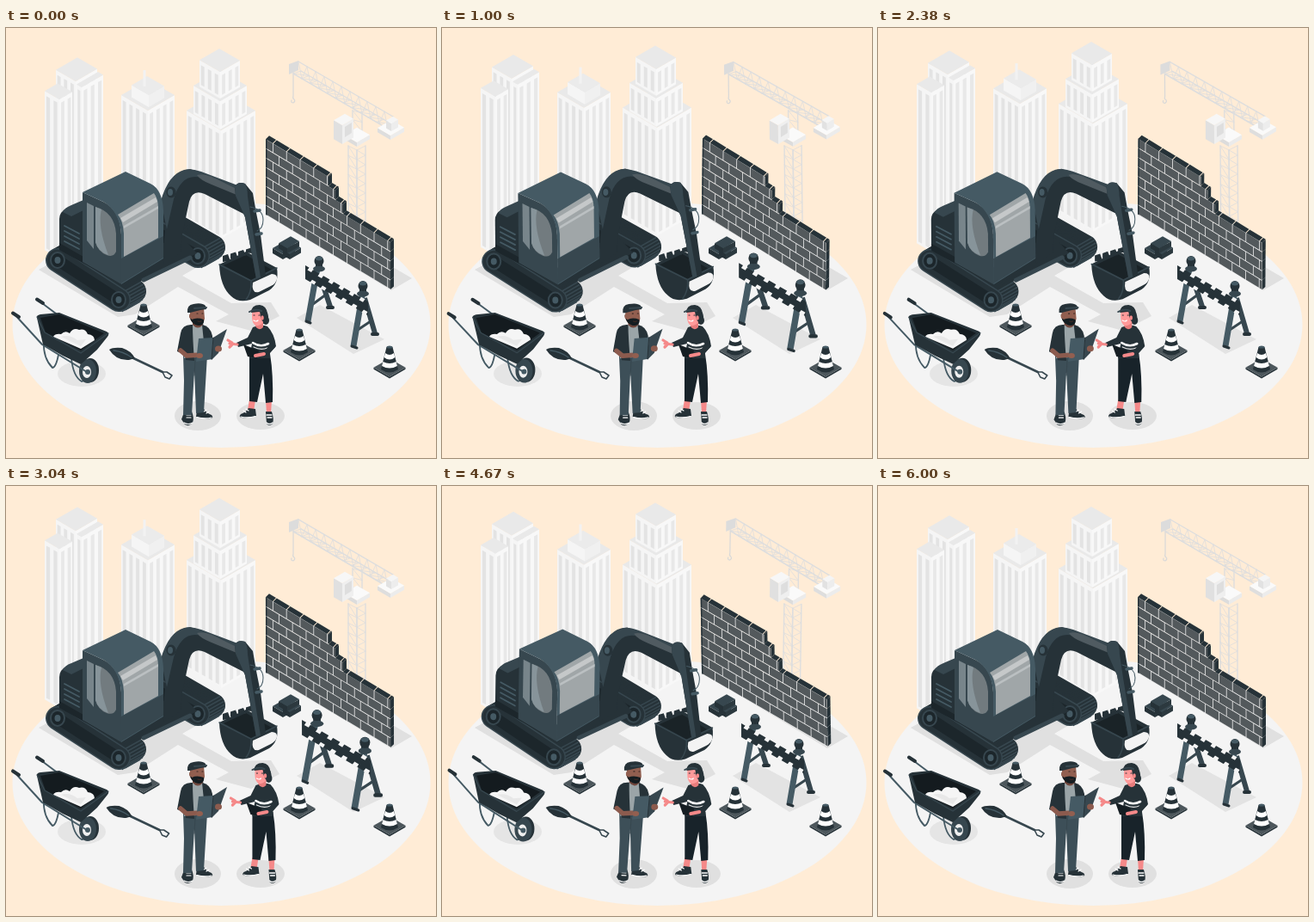
These frames come from a looping animation (500 px wide and 500 px high, 6.04 s). An HTML page:

```html
<!DOCTYPE html>
<html lang="en">
<head>
<meta charset="utf-8">
<title>Construction site</title>
<style>
html, body { margin: 0; width: 100%; height: 100%; overflow: hidden; background: #ffecd6 }
svg { display: block; width: 100%; height: 100% }
</style>
</head>
<body>
<svg id="stage" viewBox="0 0 500 500"></svg>
<script>
const INK = '#263238', DARK = '#37474f', MID = '#455a64', SHADE = '#e0e0e0';
const K = 0.577;

const poly = (pts, fill) => `<polygon points="${pts}" fill="${fill}"/>`;
const path = (d, fill) => `<path d="${d}" fill="${fill}"/>`;
const line = (d, color, w = 1, cap = 'round') =>
  `<path d="${d}" fill="none" stroke="${color}" stroke-width="${w}" stroke-linecap="${cap}" stroke-linejoin="round"/>`;
const oval = (x, y, rx, ry, fill) => `<ellipse cx="${x}" cy="${y}" rx="${rx}" ry="${ry}" fill="${fill}"/>`;
const group = (id, ...parts) => `<g id="${id}">${parts.join('')}</g>`;
const times = (n, f) => Array.from({ length: n }, (_, i) => f(i)).join('');

// Isometric block; (x, y) is the front corner of its top, a and b run left and right
function box(x, y, a, b, h, top, left, right) {
  const l = [x - a, y - a * K], r = [x + b, y - b * K];
  return poly([x, y, ...l, l[0], l[1] + h, x, y + h], left) +
    poly([x, y, ...r, r[0], r[1] + h, x, y + h], right) +
    poly([x, y, ...l, x - a + b, y - (a + b) * K, ...r], top);
}

function stripes(x, y, len, dir, n, h, color) {
  const step = len / n;
  return times(n, i => {
    const p = x + dir * (i + .28) * step, q = p + dir * step * .5;
    const v = u => y - Math.abs(u - x) * K + 5;
    return poly([p, v(p), q, v(q), q, v(q) + h - 8, p, v(p) + h - 8], color);
  });
}

const tower = (x, y, a, b, h, n, m) =>
  box(x, y, a, b, h, '#e9e9e9', '#f5f5f5', '#f8f8f8') +
  stripes(x, y, a, -1, n, h, '#e3e3e3') + stripes(x, y, b, 1, m, h, '#e8e8e8');

function lattice(x0, y0, x1, y1, dx, dy, n) {
  let zig = '';
  for (let i = 0; i <= n; i++) {
    const x = x0 + (x1 - x0) * i / n, y = y0 + (y1 - y0) * i / n;
    zig += `M${x},${y}l${dx},${dy}`;
    if (i < n) zig += `M${x},${y}L${x + (x1 - x0) / n + dx},${y + (y1 - y0) / n + dy}`;
  }
  return line(`M${x0},${y0}L${x1},${y1}M${x0 + dx},${y0 + dy}L${x1 + dx},${y1 + dy}`, '#dedede', 1.4) +
    line(zig, '#dedede', .8);
}

function wall() {
  const limit = [145, 145, 145, 145, 145, 90, 81, 73], H = 11;
  let s = '';
  limit.forEach((w, r) => {
    const y = -(r + 1) * H, next = limit[r + 1] || 0;
    s += `<path d="M${w},${y}l4,-6v${H}l-4,6z" fill="${INK}"/><path d="M0,${y}H${w}v${H}H0z" fill="#ececec"/>`;
    for (let x = r % 2 ? -7 : 0; x < w; x += 15.8) {
      const a = Math.max(x, 0), b = Math.min(x + 15, w);
      if (b - a < 1) continue;
      s += `<rect x="${a}" y="${y + .4}" width="${b - a}" height="${H - .9}" fill="#53595c"/>`;
      const c = Math.max(a, next);
      if (c < b) s += `<path d="M${c},${y + .3}l4,-6.5H${b + 4}l-4,6.5z" fill="${INK}"/>`;
    }
    s += `<path d="M0,${y}h1.5v${H}h-1.5z" fill="${INK}"/>`;
  });
  return `<g transform="matrix(1 .6 0 1 302 217)">${s}</g>`;
}

function cone(x, y) {
  return box(x, y + 9.5, 18.5, 18.5, 2, '#4d575c', INK, INK) +
    path(`M${x - 3.5},${y - 25}L${x - 10},${y + 1}Q${x},${y + 8} ${x + 10},${y + 1}L${x + 3.5},${y - 25}z`, INK) +
    [[-18, 5], [-8, 7.6]].map(([d, r]) =>
      path(`M${x - r},${y + d}q${r},4 ${2 * r},0l1.3,5q${-r - 1.3},5 ${-2 * r - 2.6},0z`, '#fff')).join('') +
    oval(x, y - 25, 3.5, 1.6, MID);
}

function track(x0, y0, x1, y1) {
  const bar = (c, w, dx = 0, dy = 0) => line(`M${x0 + dx},${y0 + dy}L${x1 + dx},${y1 + dy}`, c, w);
  const wheel = (x, y) => oval(x, y, 9, 10, DARK) + oval(x, y, 7, 8, '#1c262b') + oval(x, y, 3.5, 4, MID);
  return times(9, i => bar(INK, 28, 18 - i * 2, -10 + i * 1.15)) +
    times(9, i => {
      const a = -.9 + i * .27, x = x1 + 14 * Math.cos(a), y = y1 + 14 * Math.sin(a);
      return line(`M${x},${y}l17,-9.5`, DARK, 1.6);
    }) +
    bar(DARK, 28) + bar(INK, 25) + bar('#1c262b', 13) + wheel(x0, y0) + wheel(x1, y1);
}

const skyline = group('skyline',
  tower(81, 62, 23, 25, 200, 3, 3), tower(88, 69, 6, 25, 200, 1, 3), tower(62, 83, 17, 15, 185, 2, 2),
  tower(165, 96, 31, 31, 130, 4, 4), box(166, 78, 20, 18, 14, '#ebebeb', '#f5f5f5', '#f0f0f0'),
  line('M161,49V68', '#f2f2f2', 3, 'butt'),
  tower(250, 119, 40, 40, 126, 5, 5), tower(249, 85, 31, 31, 33, 4, 4), tower(249, 51, 24, 23, 31, 3, 3));

const crane = group('crane',
  lattice(398, 137, 398, 226, 10, 5, 8), lattice(408, 142, 408, 230, 10, -5, 8),
  lattice(403, 96, 403, 128, 11, 3, 3),
  box(408, 133, 15, 15, 5, '#fafafa', '#dcdcdc', '#ebebeb'),
  box(391, 113, 10, 13, 22, '#f7f7f7', SHADE, '#efefef'), poly([394, 115, 402, 110, 402, 122, 394, 127], '#dedede'),
  lattice(340, 39, 450, 103, -6, 14, 11), lattice(334, 53, 440, 115, 9, -3, 11),
  poly([329, 42, 340, 38, 340, 49, 329, 54], '#dcdcdc'),
  line('M334,54V79M334,79q-1,3 1,4q2,2 -1,4q-3,0 -2,-3', '#d8d8d8', 1.2),
  box(447, 125, 15, 16, 5, '#fafafa', '#dedede', '#ececec'),
  box(448, 111, 6, 8, 9, '#f5f5f5', '#e2e2e2', '#ededed'));

const ground = oval(250.5, 345, 243, 143, '#f4f4f4');
const shadows = poly([38, 281, 150, 220, 250, 262, 205, 288, 262, 320, 308, 319, 318, 335, 285, 352, 244, 341, 259, 333, 200, 301, 150, 333, 130, 336], SHADE) +
  poly([302, 217, 326, 206, 472, 291, 448, 305], SHADE) +
  poly([338, 337, 365, 322, 440, 362, 404, 379], '#e3e3e3') +
  oval(88, 402, 28, 15, '#e5e5e5') + oval(223, 451, 27, 17, SHADE) + oval(296, 451, 28, 16, SHADE);

const excavator = group('excavator',
  track(148, 222, 223, 265),
  poly([120, 285, 205, 243, 222, 262, 150, 298], INK), line('M160,293L214,267', DARK, 5),
  track(60, 270, 131, 316),
  path('M62,222Q62,214 70,210L90,201L112,214V282L62,257z', INK),
  path('M66,214Q68,209 76,206L90,200V212L76,219z', DARK),
  times(4, i => line(`M68,${230 + i * 6}l17,9`, MID, 1.8)),
  poly([62, 250, 134, 291, 134, 298, 62, 258], '#1c262b'),
  // boom
  line('M179,211L193,188', MID, 6), line('M181,208L195,184', '#f0f0f0', 1),
  path('M182,267L188,202Q192,166 214,164L224,167L278,188L280,218L231,193Q217,187 213,202L205,240L203,262L184,274z', INK),
  path('M180,201Q189,170 207,165Q215,163 227,167L280,187L275,192L227,174Q204,168 195,199L187,234z', DARK),
  path('M222,171Q229,169 239,173L266,186L273,196L239,182Q226,177 222,171z', '#505b61'),
  oval(192, 191, 5.5, 6.5, INK) + oval(191, 191, 3, 4, MID),
  // cab
  path('M89,191L113,202Q133,212 134,240V298L89,272z', DARK),
  path('M89,191L139,167L168,181Q182,188 183,212V268L134,298V240Q132,213 113,202z', MID),
  path('M134,268L183,242V267L134,297z', DARK),
  path('M137,266V239Q136,224 130,217L172,192Q177,198 177,210V244z', '#a0a6a8'),
  path('M133,221L174,197L176,202L136,226z', '#c5c8c9'), path('M137,230L177,207V210L137,233z', '#bbc0c2'),
  path('M94,203L102,207V257L94,247z', '#78858b'),
  path('M104,208Q126,214 128,239V260Q125,267 117,264Q107,260 104,249z', '#727b7f'),
  path('M104,208L111,211Q106,230 119,264Q107,260 104,249z', '#87949a'),
  // bucket
  path('M248,275L279,260L315,279Q318,297 306,305L284,316Q270,320 262,312Q249,301 248,275z', INK),
  path('M253,276L279,264L309,281L285,293z', '#1a2327'),
  line('M248,275L285,294L315,279M285,294Q286,307 279,316', DARK, 1.5),
  times(4, i => poly([252 + i * 9, 272 - i * 3.5, 252 + i * 9, 265 - i * 2.5, 258 + i * 9, 263 - i * 2.5, 261 + i * 9, 271 - i * 3], INK)),
  path('M287,296L309,286Q316,286 315,292Q314,297 308,300L294,307Q285,309 287,296z', '#f3f3f3'),
  // stick
  path('M266,185Q269,178 278,181L287,192L291,215L296,240L302,288L291,292L278,220L267,195z', INK),
  path('M266,185Q269,178 278,181Q281,186 281,196L285,223L296,290L291,292L278,220L267,195z', DARK),
  line('M289,213l6,-1M291,240l6,-1', MID, 3.5),
  line('M284,208Q299,211 299,223Q299,233 292,236', MID, 1));

const bricks = [[322, 263, 12, 14], [330, 263, 8, 13], [327, 256, 10, 14]].map(([x, y, a, b]) =>
  box(x, y, a, b, 6, DARK, INK, '#2c393f')).join('');

const lamp = (x, y) => line(`M${x},${y + 2}v8`, INK, 8, 'butt') + oval(x, y + 9, 7, 3.5, DARK) +
  oval(x, y, 5.5, 6, INK) + oval(x, y - 3, 4, 2.5, MID);

const barricade = group('barricade',
  line('M365,288L377,324M417,314L429,355', DARK, 6, 'butt'), line('M374,325h6M426,356h6', INK, 4),
  line('M357,321L372,310M409,351L424,341', DARK, 3),
  line('M362,280L351,341M415,306L404,370', MID, 7, 'butt'), line('M349,341l5,2M402,370l6,2', INK, 3),
  lamp(364, 271), lamp(415, 300),
  `<g transform="matrix(1 .58 0 1 348 276)"><path d="M0,0H73V16H0z" fill="${INK}"/>` +
  times(6, i => `<path d="M${5 + i * 12},-1h4.5l-2.5,5h-4.5z M${8 + i * 12},12h4.5l-2,4.5h-5z" fill="#f5f5f5"/>`) + '</g>');

const barrow = group('barrow',
  line('M44,365Q43,384 54,395Q58,395 61,380M76,384Q78,405 88,411L104,407', MID, 1.8),
  oval(98, 398, 10, 14, INK) + oval(95, 399, 10, 14, DARK) + oval(94, 400, 5, 7, '#f0f0f0') + oval(95, 400, 3, 3, MID),
  line('M10,333L42,368L94,400M38,317L62,335', MID, 2),
  line('M8,331.5L15,336M36,315.5L43,320', INK, 4),
  path('M36,337Q35,334 40,333L62,331L117,353Q121,355 118,359L106,374L87,391L66,381L43,368z', INK),
  path('M40,337L62,333L114,355L87,375L46,354z', '#141b1f'),
  path('M55,359Q57,355 64,356Q69,351 74,355Q78,348 85,351Q92,349 95,356Q103,357 103,363L87,373z', '#f5f5f5'),
  path('M64,359Q74,356 83,363L93,362L87,370z', '#e8e8e8'),
  line('M36,336L45,354L87,378L119,355', DARK, 1.2));

const shovel = group('shovel',
  line('M144,382L182,400', DARK, 2.6), line('M182,400L187,400L193,404L190,408L185,406z', DARK, 1.6),
  path('M120,374Q124,371 135,372Q145,375 150,384L143,386Q128,387 120,374z', INK),
  line('M125,375Q136,376 146,383', MID, 1.3));

const shoe = (x, y, flip) => `<g transform="translate(${x} ${y}) scale(${flip} 1)">` +
  path('M-5,-6L3,-7Q6,-2 12,0Q15,3 11,4Q2,5 -6,2z', INK) + line('M-5,2.5Q4,5 12,3M3,-4l3,-2M6,-2l3,-2', '#fff', 1.2) + '</g>';

const man = group('man',
  shoe(227, 450, 1),
  path('M204,455Q206,449 208,446L216,446Q219,453 217,459Q213,464 208,461z', INK), line('M207,459q5,3 10,0M210,450h5M210,453h5', '#fff', 1.2),
  path('M206,380L234,380L230,447L221,448L219,399L216,450L206,450L207,410z', '#3d4f58'),
  line('M220,386L219,404M208,384L230,385', DARK, 1),
  path('M215,345L229,344L237,354L234,382L207,384L208,352z', '#9ba5a8'),
  path('M217,345Q205,344 203,355L199,376L208,380L209,386L219,387Q217,361 217,345z', INK),
  path('M228,345Q238,347 240,358L240,378L232,385Z', INK),
  line('M203,375L210,381L226,380', '#8c5b4e', 5.5),
  path('M217,334L229,334V345Q223,352 217,345z', '#70463c'),
  path('M214,328L230,326L231,338Q230,344 224,345Q215,344 214,337z', '#925f50'),
  path('M213,333L216,339Q222,336 230,339Q231,345 225,346Q215,346 213,333z', '#151d21'),
  oval(215, 335, 2, 3, '#925f50'),
  line('M222,332h1M228,332h1M223,341q2,1 4,0', '#3a2824', 1.2),
  path('M211,331Q210,322 218,321Q228,319 232,323L233,327L226,328L214,331z', INK), line('M219,326L233,325', DARK, 2),
  poly([224, 361, 241, 360, 240, 385, 221, 388], MID), poly([241, 360, 257, 350, 247, 378, 239, 386], DARK),
  line('M241,360L239,385', INK, 1), oval(247, 373, 4, 3.5, '#8c5b4e'), oval(225, 381, 4, 3, '#925f50'));

const woman = group('woman',
  path('M283,432l7,1l-2,13l-7,-2zM302,433h7l-1,15h-5z', '#f58989'),
  shoe(285, 449, -1),
  path('M302,446L309,446Q312,455 310,460Q306,464 303,460z', INK), line('M303,459q3,3 7,0M303,450h6M304,453h5', '#fff', 1.3),
  path('M283,381L307,379Q311,403 310,435L302,436L299,402L292,435L283,434z', '#18232a'),
  oval(302, 340, 4, 5, INK),
  path('M287,348Q297,344 304,347Q312,355 314,370L307,378L307,384L283,384L286,367L270,371L268,366L281,360z', INK),
  line('M287,366Q296,372 305,367', '#fff', 2.6), line('M288,371Q296,375 304,372', '#e6e6e6', 1.2),
  line('M269,368L260,367M263,366l-5,-3M263,368l-3,3', '#f58989', 3.2),
  path('M291,338H299V348Q294,353 290,347z', '#e77c7c'),
  path('M286,329L300,328L300,341Q296,347 290,346Q286,343 286,336z', '#ff9a9a'),
  path('M295,329Q304,326 305,335Q306,342 300,343Q297,340 296,336z', INK), oval(298, 337, 1.8, 2.8, '#f58989'),
  line('M288,334h1M294,334h1', INK, 1.2), line('M288,340q3,2 5,0', '#fff', 1.2),
  path('M285,331Q285,322 295,322Q303,323 304,332L294,330z', INK), line('M283,330Q290,326 297,329', DARK, 2),
  path('M276,368L294,375L292,384L281,382z', '#151e23'),
  line('M310,370L303,377', INK, 6), line('M300,379L290,381', '#f58989', 4));

document.getElementById('stage').innerHTML =
  `<rect width="500" height="500" fill="#ffecd6"/>` + ground + skyline + crane + shadows +
  group('wall', wall()) + bricks + excavator + barricade + cone(160, 347) + cone(341, 376) + cone(446, 396) +
  barrow + shovel + man + woman;

const LOOP = 6040, SPAN = 6000;
const part = {};
document.querySelectorAll('g[id]').forEach(g => part[g.id] = g);
const move = (id, v) => part[id].setAttribute('transform', v);

// Linear keyframes as [percent, value]
function tween(p, keys) {
  const i = Math.max(1, keys.findIndex(k => k[0] >= p));
  const [p0, v0] = keys[i - 1], [p1, v1] = keys[i];
  return v0 + (v1 - v0) * (p - p0) / (p1 - p0);
}
const FLOAT = [[0, 0], [50, -10], [100, 0]];
const WIND = [[0, 0], [25, 1], [75, -1], [100, 0]];
const BEAT = [[0, 1], [10, 1.1], [30, 1], [40, 1], [50, 1.1], [60, 1], [100, 1]];
const SHAKE = [0, -1, 2, -4, 4, -4, 4, -4, 2, -1, 0].map((v, i) => [i * 10, v]);

function draw(now) {
  const p = Math.min(100, now % LOOP / SPAN * 100);
  const wind = tween(p, WIND), shake = tween(p, SHAKE);
  move('skyline', `translate(0 ${tween(p, FLOAT)})`);
  move('wall', `rotate(${wind} 376 215)`);
  move('crane', `rotate(${-wind} 396 132)`);
  move('excavator', `rotate(${-wind} 180 248)`);
  move('barrow', `rotate(${-wind} 63 363)`);
  move('man', `rotate(${-wind} 228 391)`);
  move('barricade', `translate(390 319) scale(${tween(p, BEAT)}) translate(-390 -319)`);
  move('shovel', `translate(${shake} 0)`);
  move('woman', `translate(${-shake} 0)`);
  requestAnimationFrame(draw);
}
requestAnimationFrame(draw);
</script>
</body>
</html>
```
